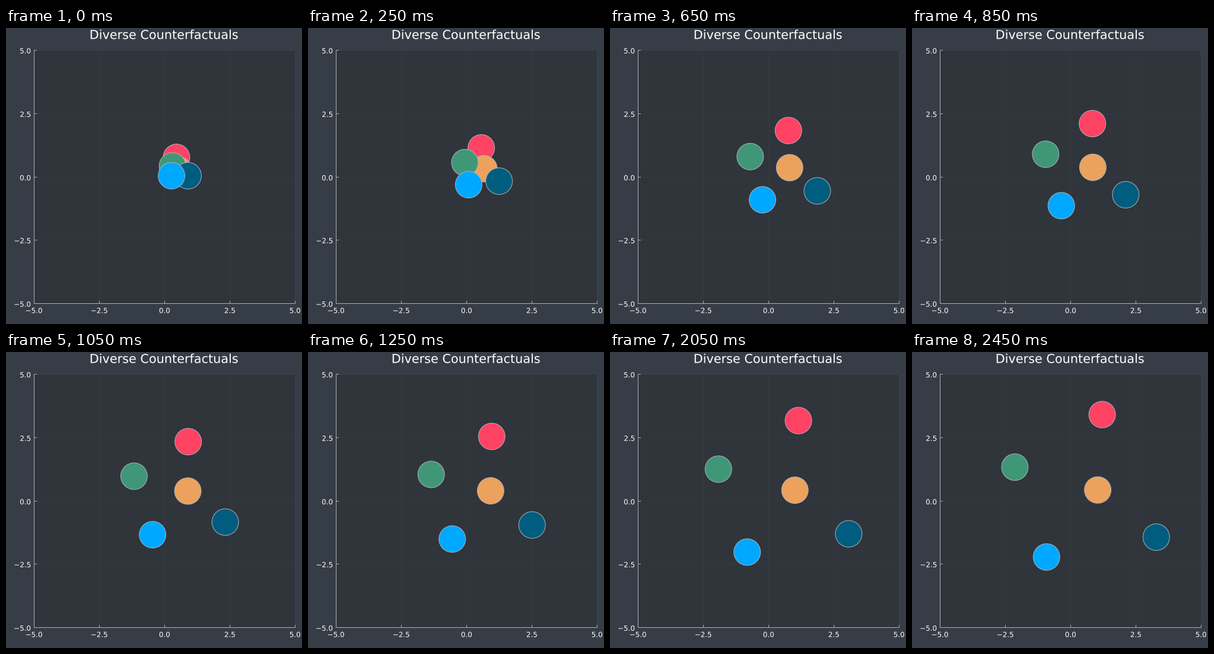
Animation, 499 px wide and 499 px high, one loop 2500 ms. Source, as a matplotlib script:

```python
import matplotlib.pyplot as plt
import numpy as np
from matplotlib.animation import FuncAnimation
from matplotlib.patches import Circle, PathPatch, Rectangle
from matplotlib.textpath import TextPath
from matplotlib.transforms import Affine2D

SIZE, DPI = 499, 100
FRAMES, INTERVAL = 50, 50
LEFT, RIGHT, TOP, BOTTOM = 47.5, 487.5, 37.5, 464.5
BACK, INSIDE, FORE, TEXT = "#363D46", "#30343B", "#ADB2B7", "#FFFFFF"
LINE = 72 / DPI  # one pixel in points
RADIUS, TICK = 22.45, 4.5

# colour, start, end, pace (below 1 leaves sooner), in drawing order
DOTS = [
    ("#FE4365", (287.4, 218.1), (320.6, 105.5), 1.02),
    ("#ECA25C", (290.0, 239.0), (313.1, 232.6), 0.66),
    ("#3F9778", (280.6, 232.7), (173.4, 194.1), 0.99),
    ("#005D7F", (306.9, 249.0), (411.8, 312.1), 1.01),
    ("#00A8FF", (279.0, 249.0), (226.8, 345.6), 0.97),
]


def spread(u):
    """Repulsion that fades as the dots move apart, from 0 to 1."""
    return np.log1p(16 * u ** 1.5) / np.log(17)


fig = plt.figure(figsize=(SIZE / DPI, SIZE / DPI), dpi=DPI, facecolor=BACK)
ax = fig.add_axes([0, 0, 1, 1])
ax.set_xlim(0, SIZE)
ax.set_ylim(SIZE, 0)
ax.axis("off")


def stroke(xs, ys, alpha=1):
    ax.plot(xs, ys, color=FORE, lw=LINE, alpha=alpha,
            solid_capstyle="butt", snap=False)


def label(x, baseline, text, size, anchor):
    """Text whose ink is centred (0.5) or ends (1) at x."""
    path = TextPath((0, 0), text, size=size, prop="DejaVu Sans")
    box = path.get_extents()
    place = Affine2D().scale(1, -1).translate(
        x - box.x0 - anchor * box.width, baseline)
    ax.add_patch(PathPatch(place.transform_path(path), facecolor=TEXT,
                           lw=0, snap=False))


ax.add_patch(Rectangle((LEFT, TOP), RIGHT - LEFT, BOTTOM - TOP,
                       facecolor=INSIDE, lw=0, zorder=0))

for value in np.linspace(-5, 5, 5):
    share = (value + 5) / 10
    x = LEFT + (RIGHT - LEFT) * share
    y = np.floor(BOTTOM - (BOTTOM - TOP) * share) + 0.5
    text = f"{value:.1f}".replace("-", "\u2212")
    stroke([x, x], [TOP, BOTTOM], alpha=0.05)
    stroke([LEFT, RIGHT], [y, y], alpha=0.05)
    stroke([x, x], [BOTTOM, BOTTOM - TICK])
    stroke([LEFT, LEFT + TICK], [y, y])
    label(x - 0.2, 480.5, text, 11.9, 0.5)
    label(41.2, y + 5.3, text, 11.9, 1)

stroke([LEFT, LEFT], [TOP, BOTTOM])
stroke([LEFT, RIGHT], [BOTTOM, BOTTOM])
label(266.7, 18.5, "Diverse Counterfactuals", 20.8, 0.5)

dots = [ax.add_patch(Circle(start, RADIUS, facecolor=color, edgecolor=FORE,
                            lw=LINE, zorder=5 + k))
        for k, (color, start, _, _) in enumerate(DOTS)]


def update(frame):
    progress = spread(frame / (FRAMES - 1))
    for dot, (_, start, end, pace) in zip(dots, DOTS):
        start, end = np.array(start), np.array(end)
        dot.center = start + (end - start) * progress ** pace
    return dots


anim = FuncAnimation(fig, update, frames=FRAMES, interval=INTERVAL,
                     repeat=True, repeat_delay=0)
plt.show()
```
